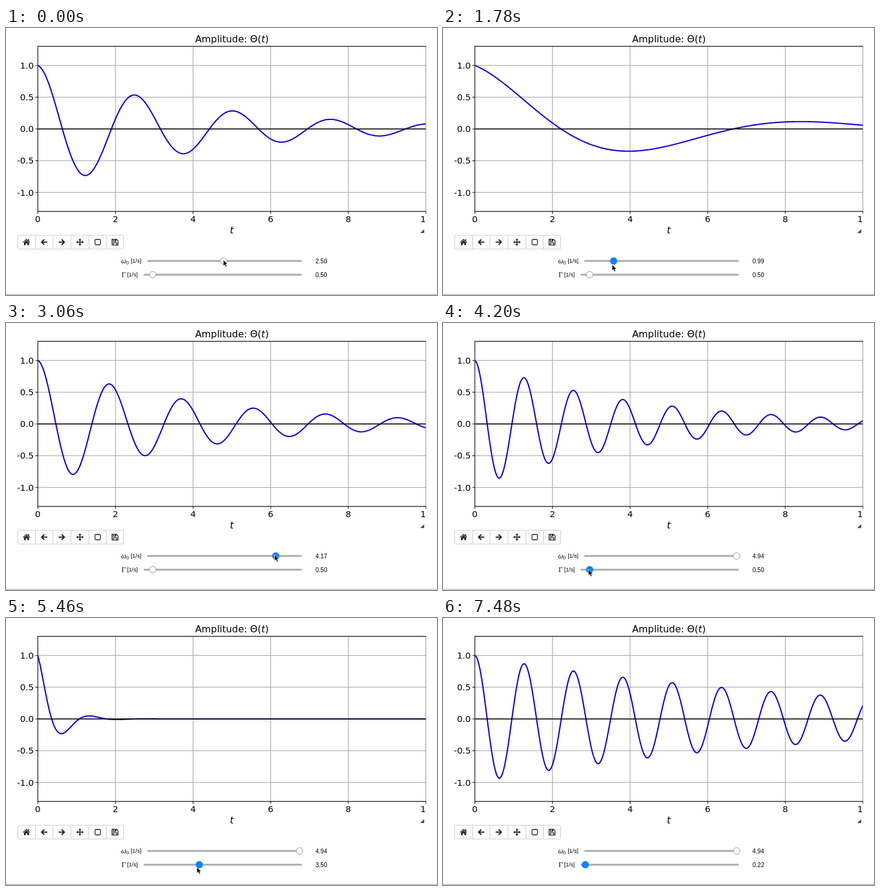
An HTML page that plays this animation: 720x447 px, repeating every 7500 ms.

```html
<!DOCTYPE html>
<html lang="en">
<head>
<meta charset="utf-8">
<title>Damped oscillation</title>
<style>
  html, body { margin: 0; width: 100%; height: 100%; overflow: hidden; background: #fff; }
  svg { display: block; width: 720px; height: 447px; }
  .plot { font-family: "DejaVu Sans", sans-serif; font-size: 14.4px; }
  .big { font-size: 15.9px; }
  .it { font-style: italic; }
  .ui { font-family: "Liberation Sans", Arial, sans-serif; font-size: 9.4px; }
  .val { font-size: 10px; }
  .math { font-family: "Liberation Serif", "Times New Roman", serif; font-size: 12px; }
  .sub { font-size: 8px; }
  .icon { fill: none; stroke: #222; stroke-width: 2; }
  .solid { fill: #222; stroke: none; }
</style>
</head>
<body>
<svg viewBox="0 0 720 447">
  <defs>
    <clipPath id="axes"><rect x="53" y="30" width="648.6" height="277"/></clipPath>
    <clipPath id="figure"><rect width="701.8" height="345"/></clipPath>
  </defs>

  <g class="plot" clip-path="url(#figure)">
    <text class="big" x="316" y="24.3">Amplitude: Θ(<tspan class="it">t</tspan>)</text>
    <text class="big it" x="377" y="344.3" text-anchor="middle">t</text>
    <path id="grid" stroke="#b0b0b0" stroke-width="1.3"/>
    <g clip-path="url(#axes)">
      <path id="curve" fill="none" stroke="#0a00e0" stroke-width="2.1" stroke-linejoin="round"/>
      <path d="M53 169H702" stroke="#000" stroke-width="1.4"/>
    </g>
    <path d="M701.3 30.5V307" stroke="#777"/>
    <path d="M702 30.6H53.2V307.1H702" fill="none" stroke="#111" stroke-width="1.2"/>
    <path id="ticks" stroke="#111" stroke-width="1.1"/>
    <g id="labels"></g>
  </g>
  <path d="M698.5 337V343.3H692Z" fill="#444"/>

  <rect x="19.5" y="347" width="177" height="23" rx="2" fill="#fff" stroke="#ccc"/>
  <path d="M49.5 347V370M78.5 347V370M108.5 347V370M138.5 347V370M167.5 347V370" stroke="#ccc"/>
  <g class="icon">
    <path class="solid" d="M34.3 353L40.4 358.6L39.6 359.4L34.3 354.7L29 359.4L28.2 358.6ZM37 353.4H38.7V356.8L37 355.2ZM34.3 355.6L38.6 359.4V363.4H35.6V360.4H33V363.4H30V359.4Z"/>
    <path d="M69 358.5H60M64 354L59.5 358.5L64 363"/>
    <path d="M88 358.5H97M93 354L97.5 358.5L93 363"/>
    <path stroke-width="1.6" d="M119 358.5H128M123.5 354V363"/>
    <path class="solid" d="M123.5 352.3L126 355.2H121ZM123.5 364.7L126 361.8H121ZM117.3 358.5L120.2 356V361ZM129.7 358.5L126.8 356V361Z"/>
    <rect x="148.7" y="354" width="9" height="9" rx="1.5" stroke-width="1.3"/>
    <path stroke-width="1.3" d="M177.2 353.6H184.6L187.2 356.2V363.4H177.2ZM179.4 363V359.6H185V363M179.4 354V357H183.6V354"/>
    <path class="solid" d="M181.8 354H183.4V356.6H181.8Z"/>
  </g>

  <g class="ui">
    <text class="math it" x="192.5" y="393.6">ω</text>
    <text class="math sub" x="201" y="395.6">0</text>
    <text x="208.5" y="393.4">[1/s]</text>
    <text class="math" x="193" y="416.6">Γ</text>
    <text x="202.5" y="416.4">[1/s]</text>
    <text class="val" id="omegaVal" x="517" y="393.5"></text>
    <text class="val" id="gammaVal" x="517" y="416.5"></text>
  </g>
  <path d="M237.3 390H492.7M231.3 413H492.7" stroke="#aaa" stroke-width="3" stroke-linecap="round"/>
  <g id="omegaKnob">
    <circle cy="390" r="5.5" fill="#fff" stroke="#999"/>
    <circle cy="390" r="5.9" fill="#0a84ff"/>
  </g>
  <g id="gammaKnob">
    <circle cy="413" r="5.5" fill="#fff" stroke="#999"/>
    <circle cy="413" r="5.9" fill="#0a84ff"/>
  </g>
  <path id="cursor" d="M0 0V10.4L2.4 8.3L4.1 12L6 11.1L4.4 7.6H7.5Z" fill="#000" stroke="#fff" stroke-width=".8"/>
  <path d="M0 446H720" stroke="#999"/>
</svg>

<script>
const LOOP = 7500, LAG = 280;
const $ = id => document.getElementById(id);
const px = t => 53.2 + 64.83 * t;
const py = v => 169 - 106.3 * v;
const clamp = x => Math.max(0, Math.min(1, x));
const ease = x => (x = clamp(x), x * x * (3 - 2 * x));

// Smooth curve through [time, value] keys that never overshoots them
function track(...keys) {
  const slope = i => (keys[i + 1][1] - keys[i][1]) / (keys[i + 1][0] - keys[i][0]);
  const tangent = i => {
    if (i === 0 || i === keys.length - 1) return 0;
    const a = slope(i - 1), b = slope(i);
    return a * b > 0 ? 2 * a * b / (a + b) : 0;
  };
  return time => {
    const last = keys.length - 1;
    if (time <= keys[0][0]) return keys[0][1];
    if (time >= keys[last][0]) return keys[last][1];
    const i = keys.findIndex(k => k[0] > time) - 1;
    const [t0, v0] = keys[i], [t1, v1] = keys[i + 1];
    const h = t1 - t0, s = (time - t0) / h, r = 1 - s;
    return v0 * (1 + 2 * s) * r * r + v1 * s * s * (3 - 2 * s)
      + h * s * r * (r * tangent(i) - s * tangent(i + 1));
  };
}

const omega = track([580, 2.5], [1300, .6], [1500, .75], [1780, .99], [2780, 3.39], [3060, 4.17], [3400, 4.94]);
const gamma = track([4340, .5], [5000, 5], [5180, 4.45], [5460, 3.5], [5920, .73], [6200, .36], [6360, .22]);
const cursorDx = track([0, -.5], [1780, -2.5], [3060, -2], [4200, -2], [5460, -4], [6200, -4.5]);
const cursorY = track([0, 388], [600, 389], [1300, 392], [1780, 396], [2150, 394], [3060, 388], [3600, 392],
  [4100, 412], [4400, 413], [4900, 420.5], [5200, 420.5], [5460, 417], [5900, 413], [6200, 412]);

function buildAxes() {
  let grid = "", ticks = "", labels = "";
  for (let t = 0; t <= 10; t += 2) {
    const x = px(t);
    if (t % 10) grid += `M${x} 31V307`;
    ticks += `M${x} 307V311`;
    labels += `<text x="${x}" y="325" text-anchor="middle">${t}</text>`;
  }
  for (let v = -1; v <= 1; v += .5) {
    const y = py(v);
    grid += `M53 ${y}H702`;
    ticks += `M49.2 ${y}H53`;
    labels += `<text x="46.3" y="${y + 5.2}" text-anchor="end">${v.toFixed(1)}</text>`;
  }
  $("grid").setAttribute("d", grid);
  $("ticks").setAttribute("d", ticks);
  $("labels").innerHTML = labels;
}

function curvePath(w0, g) {
  const w = Math.sqrt(w0 * w0 - g * g / 4);
  let d = "";
  for (let i = 0; i <= 400; i++) {
    const t = i / 40;
    const v = Math.exp(-g * t / 2) * Math.cos(w * t);
    d += (i ? "L" : "M") + px(t).toFixed(2) + " " + py(v).toFixed(2);
  }
  return d;
}

function setSlider(name, x, value, active) {
  const knob = $(name + "Knob");
  knob.setAttribute("transform", `translate(${x})`);
  knob.lastElementChild.setAttribute("opacity", active);
  $(name + "Val").textContent = value.toFixed(2);
}

function draw(time) {
  const w = omega(time), g = gamma(time);
  const wx = 233.4 + 52.05 * w, gx = 232 + 26 * g;
  const toGamma = ease((time - 4020) / 120);
  setSlider("omega", wx, w, ease((time - 20) / 200) * (1 - toGamma));
  setSlider("gamma", gx, g, toGamma);
  $("curve").setAttribute("d", curvePath(omega(time - LAG), gamma(time - LAG)));

  const move = ease((time - 3640) / 450);
  const cx = wx + (gx - wx) * move + cursorDx(time);
  $("cursor").setAttribute("transform", `translate(${cx} ${cursorY(time)})`);
  $("cursor").setAttribute("visibility", time < 7400 ? "visible" : "hidden");
}

buildAxes();
const start = performance.now();
function tick() {
  draw((performance.now() - start) % LOOP);
  requestAnimationFrame(tick);
}
tick();
</script>
</body>
</html>
```
